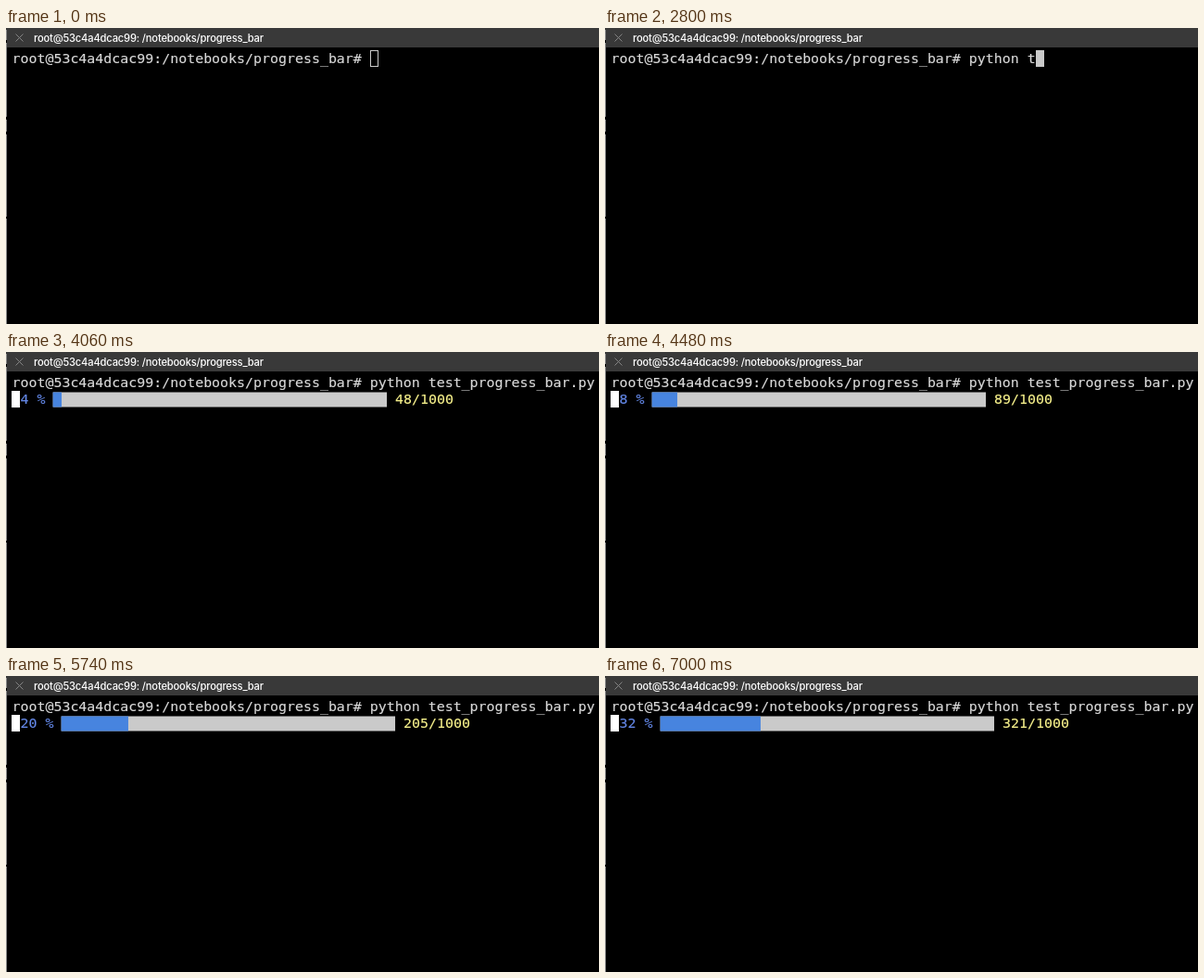
Animation, 640 px wide and 320 px high, one loop 7.07 s. Source, as an HTML page:

```html
<!DOCTYPE html>
<html lang="en">
<head>
<meta charset="utf-8">
<title>Terminal progress bar</title>
<style>
  html, body { margin: 0; width: 100%; height: 100%; overflow: hidden; background: #000; }
  svg { display: block; width: 640px; height: 320px; }
  text { white-space: pre; }
  .title { font: 500 11.2px Inter, "Open Sans", sans-serif; letter-spacing: -.19px; fill: #fff; }
  .mono { font: 14.93px "DejaVu Sans Mono", monospace; fill: #d8d8d8; stroke: #d8d8d8; stroke-width: .15px; }
  #percent { fill: #6488e8; stroke: #6488e8; }
  #count { fill: #f8f28c; stroke: #f8f28c; }
</style>
</head>
<body>
<svg viewBox="0 0 640 320">
  <rect width="640" height="320"/>
  <rect width="640" height="21" fill="#393939"/>
  <path d="M.5 2V320" stroke="#8a8a8a"/>
  <path d="M.5 13v3M.5 96v3M.5 112v3M.5 204v2" stroke="#000"/>
  <path d="M10.5 6.5l8 8m0-8l-8 8" stroke="#858585" stroke-width="1"/>
  <text class="title" x="30" y="15">root@53c4a4dcac99: /notebooks/progress_bar</text>
  <text class="mono" id="command" x="6.5" y="38"></text>
  <rect id="cursor"/>
  <g id="progress">
    <rect id="track" y="43.5" height="16" fill="#cacaca"/>
    <rect id="fill" y="43.5" height="16" fill="#4784df"/>
    <text class="mono" id="percent" y="56"></text>
    <text class="mono" id="count" y="56"></text>
  </g>
</svg>
<script>
const LOOP = 7070, STEP = 70;
const FOCUS = 770, COMPLETE = 3080, RUN = 3570;
const CELL = 8.99, LEFT = 6.5, BAR_CELLS = 40, TOTAL = 1000;
const PROMPT = "root@53c4a4dcac99:/notebooks/progress_bar# ";
const COMMAND = "python test_progress_bar.py";
const KEY_TIMES = [1820, 1960, 2170, 2240, 2310, 2450, 2590, 2800, 2870];
const COUNTS = [[3570, 1], [4480, 89], [5110, 148], [6370, 262], [7000, 321]];

const $ = id => document.getElementById(id);
const column = n => LEFT + n * CELL;

function set(id, attributes) {
  for (const name in attributes) $(id).setAttribute(name, attributes[name]);
}

function countAt(time) {
  const next = Math.max(1, COUNTS.findIndex(([t]) => t >= time));
  const [t0, c0] = COUNTS[next - 1], [t1, c1] = COUNTS[next];
  return Math.round(c0 + (c1 - c0) * (time - t0) / (t1 - t0));
}

function drawCursor(time, typed) {
  const running = time >= RUN;
  const hollow = time < FOCUS;
  const inset = hollow ? 0.5 : 0;
  set("cursor", {
    x: Math.round(running ? LEFT - 0.6 : column(PROMPT.length + typed)) + inset,
    y: (running ? 42 : 24) + inset,
    width: 9 - 2 * inset,
    height: 18 - 2 * inset,
    fill: hollow ? "none" : running ? "#fff" : "#c9c9c9",
    stroke: hollow ? "#c9c9c9" : "none",
    visibility: time >= COMPLETE && !running ? "hidden" : "visible"
  });
}

function drawProgress(time) {
  const running = time >= RUN;
  set("progress", { visibility: running ? "visible" : "hidden" });
  if (!running) return;
  const count = countAt(time);
  const percent = Math.floor(100 * count / TOTAL);
  const label = `${percent} % `;
  const start = 1 + label.length;
  const x = column(start) - 0.8;
  set("track", { x, width: BAR_CELLS * CELL + 0.8 });
  set("fill", { x, width: Math.floor(percent * BAR_CELLS / 100) * CELL + 0.4 });
  set("percent", { x: column(1) });
  set("count", { x: column(start + BAR_CELLS + 1) });
  $("percent").textContent = label;
  $("count").textContent = `${count}/${TOTAL}`;
}

function draw(now) {
  const time = Math.floor((now % LOOP) / STEP) * STEP;
  const typed = time >= COMPLETE ? COMMAND.length : KEY_TIMES.filter(t => t <= time).length;
  $("command").textContent = PROMPT + COMMAND.slice(0, typed);
  drawCursor(time, typed);
  drawProgress(time);
}

const begin = performance.now();
function tick() {
  draw(performance.now() - begin);
  requestAnimationFrame(tick);
}
tick();
</script>
</body>
</html>
```
